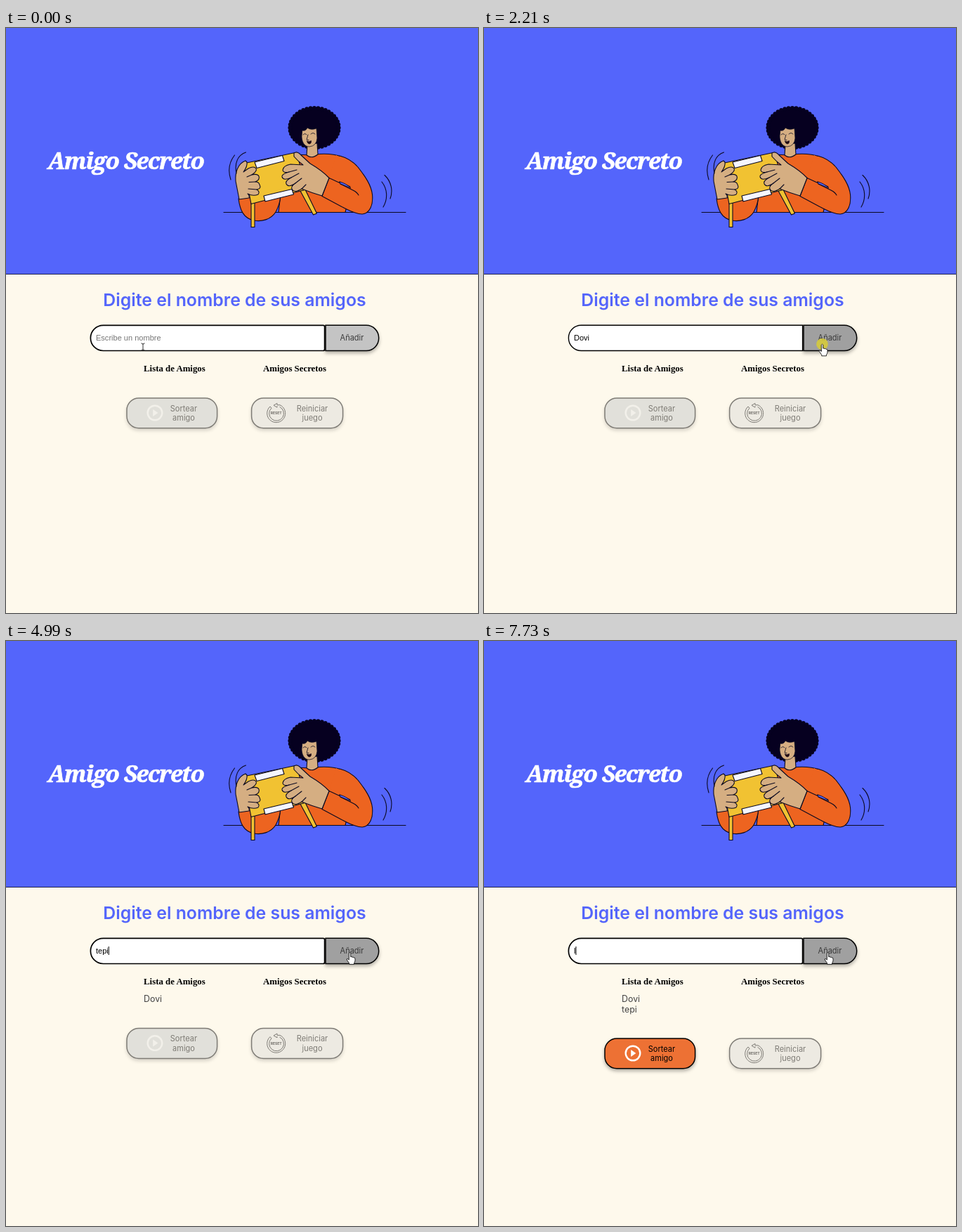
Recreate the animation shown at these times as an HTML page. Size 672 px wide and 833 px high, loop 8000 ms.

```html
<!DOCTYPE html>
<html lang="es">
<head>
<meta charset="utf-8">
<title>Amigo Secreto</title>
<style>
  html, body { margin: 0; width: 100%; height: 100%; overflow: hidden; background: #fef9ec; }
  svg { display: block; }
  .title { font: italic 900 33px "Noto Serif", serif; letter-spacing: -1.4px; text-anchor: middle;
    fill: #fff; stroke: #fff; stroke-width: .7; }
  .heading { font: 600 24.84px Inter, sans-serif; text-anchor: middle; fill: #5465fb; }
  .ui { font: 11.04px Inter, sans-serif; text-anchor: middle; }
  .field { font: 11.04px "Liberation Sans", Arial, sans-serif; }
  .column { font: bold 12.85px "Liberation Serif", "Times New Roman", serif; }
  .list { font: 12.42px Inter, sans-serif; fill: #444; }
  .shadow { filter: drop-shadow(0 3px 2.5px rgba(0, 0, 0, .3)); }
  .ink { stroke: #0b0920; stroke-width: 1.1; stroke-linejoin: round; stroke-linecap: round; }
  .orange { fill: #ed6420; }
  .skin { fill: #d5ae82; }
  .yellow { fill: #f1c232; }
  .line { fill: none; }
</style>
</head>
<body>
<svg width="672" height="833" viewBox="0 0 672 833">
  <rect width="672" height="833" fill="#fef9ec"/>
  <rect width="672" height="350" fill="#5465fb"/>
  <rect y="350" width="672" height="1" fill="#1d1f4d"/>
  <text class="title" x="170.5" y="201">Amigo Secreto</text>

  <g class="ink">
    <path class="line" d="M310 262.5H569"/>
    <!-- torso and far sleeve -->
    <path class="orange" d="M388 262.5L392 228L412 179.5Q430 182 446 179.5C468 178 486 184 499 196L483 262.5Z"/>
    <path class="orange" d="M331 243L391 235Q391 249 384 262C377 273 364 276 353 274C338 271 333 259 331 243Z"/>
    <path class="yellow" d="M349 248H354V283.5H349Z"/>
    <path class="yellow" d="M419 232L426 230L442.5 264L437.5 266Z"/>
    <!-- near sleeve -->
    <path class="orange" stroke="none" d="M470 181L499 196L521 237L506 264L480 256L450 240L460 214Z"/>
    <path class="orange" d="M475 182C487 185 494 190 501 198C512 212 520 224 521.5 237C523 252 518 264 507 265C497 265 487 259 478 254.5L450 239.5L460 213.5L476 221"/>
    <path d="M475 219L490 226L486 225Z" fill="#5465fb"/>
    <path d="M475 219Q484 221 491 228L476 222Z" fill="#5465fb" stroke-width=".8"/>
    <path class="line" d="M476 222L494 231Q500 234 502 238"/>
    <!-- hair and head -->
    <g id="hair" fill="#060020" stroke="none"><ellipse cx="439" cy="142" rx="35.5" ry="29"/></g>
    <path class="skin" d="M429 166L428 181Q435 187 444 180L443 164Z"/>
    <path class="skin" d="M422 146Q427 147 429 142Q434 146 442 143L443 157Q442 168 432 169C424 169 421 161 421 154Z" stroke-width=".7"/>
    <path class="line" d="M423 152Q426 149 428 152M434 151Q437 148 440 151M430 152L428 159L431 159.5" stroke-width=".8"/>
    <path d="M428.5 161Q432 162.5 434.5 160.5Q435 165 431.5 165Q429 164.5 428.5 161Z" fill="#24070f" stroke-width=".6"/>
    <!-- box -->
    <path class="yellow" d="M338 193L414 177L427 230L349 250.5Z"/>
    <path d="M354 191L393.5 181.5L396 189.5L357 199.5Z" fill="#f5f6ff"/>
    <path d="M367 239L407 229.5L409.5 237L369 247Z" fill="#f5f6ff"/>
    <!-- left hand -->
    <path class="skin" d="M341 189C330 193 326 206 327 218L332 244L346 242Q347 238 344 236Q352 240 359 237Q362 233 357 230Q364 229 361 223Q360 219 355 219Q362 216 360 211Q358 207 350 209Q358 204 356 200Q353 196 345 200L338 205Q344 197 343 191Z"/>
    <path class="line" d="M355 219L346 219.5M357 230L345 229M350 209L343 212"/>
    <!-- right hand -->
    <path class="skin" d="M410 178Q415 175 420 181L433 193Q450 203 460 213.5L450 239Q436 235 421 229Q410 236 407 229Q405 226 412 221Q402 228 399 222Q397 218 406 213Q395 218 393 212Q392 208 403 205Q394 207 394 202Q395 196 405 194L423 195Q415 189 410 183Z"/>
    <path class="line" d="M412 221L421 214M406 213L417 207M403 205L414 202M421 229L427 223"/>
    <!-- shaking -->
    <path class="line" d="M325.5 181C317 192 316 204 320 216M341.5 177C330 181 325 192 328 207M539 209.5C549 219 551 232 547 243M535 219C543 229 544 243 537 255"/>
  </g>

  <text class="heading" x="325.5" y="395.6">Digite el nombre de sus amigos</text>

  <path id="addButton" class="shadow" d="M455 423.3H513A17.7 18 0 0 1 530.7 441.4A17.7 18 0 0 1 513 459.5H455Z" stroke="#000" stroke-width="1.5"/>
  <text class="ui" x="492.5" y="445.3" fill="#3a3a3a">Añadir</text>
  <path id="input" fill="#fff" stroke="#000"/>
  <text id="placeholder" class="field" x="128" y="444.6" fill="#757575">Escribe un nombre</text>
  <text id="typed" class="field" x="128" y="444.6"></text>
  <rect id="caret" y="435" width="1" height="12"/>

  <text class="column" x="196" y="488.8">Lista de Amigos</text>
  <text class="column" x="366" y="488.8">Amigos Secretos</text>
  <text id="first" class="list" x="196" y="514">Dovi</text>
  <text id="second" class="list" x="196" y="528.5">tepi</text>

  <g id="actions">
    <g id="draw" class="ui shadow">
      <rect id="drawBack" x="172" y="527" width="128.6" height="42.8" rx="17" stroke="#000" stroke-width="1.5"/>
      <g id="play">
        <circle cx="212" cy="548" r="10.3" fill="none" stroke="#fff" stroke-width="2.4"/>
        <path d="M209.2 543V553L216.4 548Z" fill="#fff"/>
      </g>
      <text x="253" y="545.6">Sortear</text>
      <text x="253" y="559.4">amigo</text>
    </g>
    <g class="ui shadow" opacity=".5">
      <rect x="349.6" y="527" width="130" height="42.8" rx="17" fill="#dedcda" stroke="#000" stroke-width="1.5"/>
      <path d="M390 536.8A13 13 0 1 1 376 539L378 541.2A10.4 10.4 0 1 0 389.5 539.4M390 536.8H386V534.4L381 537.3L386 540.2V538.4" fill="none" stroke="#000" stroke-width="1"/>
      <text x="384.7" y="550.2" style="font: 800 5px Inter, sans-serif">RESET</text>
      <text x="436" y="545.6">Reiniciar</text>
      <text x="436" y="559.4">juego</text>
    </g>
  </g>

  <circle id="click" r="8.3" fill="#d8cd35" opacity=".85"/>
  <path id="beam" d="M-2.5 -5Q0 -5 0 -3.5Q0 -5 2.5 -5M0 -4V4M-2.5 5Q0 5 0 3.5Q0 5 2.5 5" fill="none" stroke="#333" stroke-width="1"/>
  <path id="hand" d="M-1.2 1Q0 -.9 1.2 1V6Q2.6 5 3.5 6.6Q5 5.8 5.7 7.3Q7.4 6.8 7.5 8.6V11.5Q7.3 13.5 6 15V16.7H-.8V15.2L-4.2 10.3Q-4.7 8.4 -2.9 8.8L-1.2 10.4Z" fill="#fff" stroke="#111" stroke-width=".9" stroke-linejoin="round"/>
</svg>
<script>
const LOOP = 8000;
const $ = id => document.getElementById(id);
const show = (id, on) => $(id).setAttribute('visibility', on ? 'visible' : 'hidden');
const set = (id, name, value) => $(id).setAttribute(name, value);
const within = (t, spans) => spans.some(([from, to]) => t >= from && t < to);
const latest = (t, steps) => steps.filter(s => s[0] <= t).pop();

const typing = [
  [0, ''], [140, 'D'], [340, 'Do'], [670, 'Dov'], [800, 'Dovi'], [2280, ''],
  [4390, 't'], [4520, 'te'], [4720, 'tep'], [4990, 'tepi'], [6260, ''], [7730, 'l']
];
const pointer = [
  [0, 195, 454], [1530, 238, 458], [1600, 352, 461], [1670, 450, 458.5],
  [1740, 474, 451], [1810, 480, 450], [1880, 481.5, 450.2],
  [2480, 483, 449], [2600, 486, 447], [2670, 488, 445], [2740, 489.5, 443.7]
];
const caretOn = [
  [140, 1330], [1880, 2140], [2280, 2870], [3330, 3860],
  [4390, 5520], [5990, 6060], [6260, 6860], [7320, LOOP]
];
const clicks = [[2140, 2280], [6060, 6260]];

// Scalloped outline of the hair
for (let i = 0; i < 40; i++) {
  const a = i / 40 * Math.PI * 2;
  const curl = document.createElementNS('http://www.w3.org/2000/svg', 'circle');
  curl.setAttribute('cx', 439 + 34.6 * Math.cos(a));
  curl.setAttribute('cy', 142 + 28 * Math.sin(a));
  curl.setAttribute('r', 3);
  $('hair').append(curl);
}

function inputPath(corner) {
  const top = 423.3, bottom = 459.5, left = 138.5, right = 453.6;
  return `M${left} ${top}H${right - corner}Q${right} ${top} ${right} ${top + corner}` +
    `V${bottom - corner}Q${right} ${bottom} ${right - corner} ${bottom}H${left}A18 18 0 0 1 ${left} ${top}Z`;
}

function render(t) {
  const text = latest(t, typing)[1];
  const clicking = within(t, clicks);
  const names = t < 2280 ? 0 : t < 6260 ? 1 : 2;
  const ready = names > 1;

  $('typed').textContent = text;
  show('placeholder', !text);
  show('caret', within(t, caretOn));
  set('caret', 'x', 128 + (text ? $('typed').getComputedTextLength() : 0));
  set('input', 'd', inputPath(clicking ? 0 : 2));
  set('input', 'stroke-width', clicking ? 1.4 : 1.7);

  show('first', names > 0);
  show('second', ready);
  set('actions', 'transform', `translate(0 ${[0, 24.6, 39][names]})`);
  set('draw', 'opacity', ready ? 1 : 0.5);
  set('play', 'opacity', ready ? 1 : 0.6);
  set('drawBack', 'fill', ready ? '#ed7134' : '#c6c9c9');

  const [, x, y] = latest(t, pointer);
  const hover = x > 454;
  set('addButton', 'fill', hover ? '#a0a0a0' : '#c4c4c4');
  for (const id of ['beam', 'hand', 'click']) set(id, 'transform', `translate(${x} ${y})`);
  show('beam', !hover);
  show('hand', hover);
  show('click', clicking);
}

const start = performance.now();
function tick() {
  render((performance.now() - start) % LOOP);
  requestAnimationFrame(tick);
}
tick();
</script>
</body>
</html>
```
